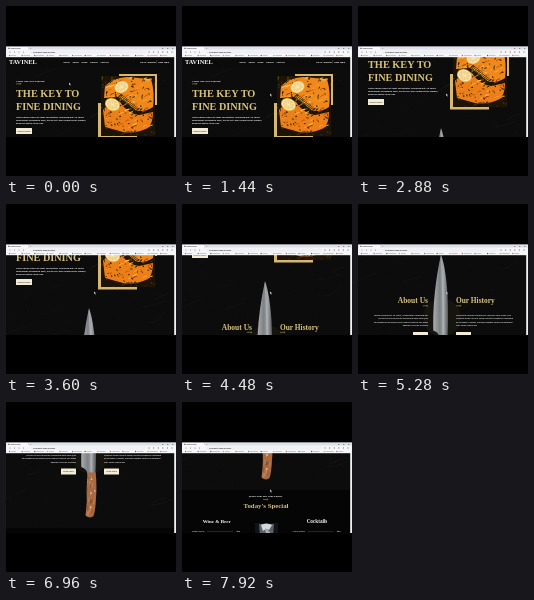
Recreate the animation shown at these times as an HTML page. Size 170 px wide and 170 px high, loop 8 s.

```html
<!DOCTYPE html>
<html lang="en">
<head>
<meta charset="utf-8">
<title>Restaurant page scroll</title>
<style>
html, body { margin: 0; width: 100%; height: 100%; overflow: hidden; background: #000; }
svg { display: block; width: 100vw; height: 100vh; }
text { white-space: pre; }
.serif { font-family: "Liberation Serif", "Noto Serif", serif; font-weight: 700; }
.sans { font-family: "Open Sans", "Noto Sans", sans-serif; font-weight: 700; }
</style>
</head>
<body>
<svg id="stage" viewBox="0 0 170 170"></svg>
<script>
const LOOP = 8000, GOLD = '#d8c27c', FRAME = '#d6b873', WHITE = '#f6f6f6', CREAM = '#f3ecd6';

// [time, value...] stops
const SCROLL = [[0, 0], [1440, 0], [1600, 2], [2080, 17], [2400, 17], [3600, 47],
  [4480, 74], [6080, 127], [7920, 200], [8000, 203]];
const POINTER = [[0, 63, 76.6], [200, 63, 76.6], [480, 70, 80], [1200, 88, 87.5], [8000, 88, 87.5]];

let seed = 11;
const rnd = (a = 0, b = 1) => {
  seed = (seed * 16807) % 2147483647;
  return a + (b - a) * seed / 2147483647;
};
const pick = list => list[rnd(0, list.length) | 0];
const many = (n, f) => Array.from({ length: n }, (_, i) => f(i)).join('');

const rect = (x, y, w, h, fill, more = '') =>
  `<rect x="${x}" y="${y}" width="${w}" height="${h}" fill="${fill}" ${more}/>`;
const path = (d, fill, more = '') => `<path d="${d}" fill="${fill}" ${more}/>`;
const text = (s, x, y, size, fill = WHITE, font = 'sans', anchor = 'start') =>
  `<text class="${font}" x="${x}" y="${y}" font-size="${size}" fill="${fill}" text-anchor="${anchor}">${s}</text>`;
const lines = (list, x, y, step, size, fill, anchor) =>
  list.map((s, i) => text(s, x, y + i * step, size, fill, 'sans', anchor)).join('');
const button = (s, x, y, w) =>
  rect(x, y, w, 6, CREAM, 'rx=".3"') + text(s, x + w / 2, y + 3.7, 1.9, '#5a5342', 'sans', 'middle');
const spoon = (x, y) =>
  path(`M${x} ${y}h3.6m0 0c.6-.6 1.4-.6 1.4 0s-.8.6-1.4 0`, 'none', `stroke="${GOLD}" stroke-width=".45"`);

function lemon(x, y, r, turn) {
  const spokes = many(8, i => `<path d="M0 0V${-r * .75}" transform="rotate(${i * 45})"/>`);
  return `<g transform="translate(${x} ${y}) rotate(${turn}) scale(1 .8)">
    <circle r="${r}" fill="#e8b23a"/><circle r="${r * .88}" fill="#f8ebc2"/>
    <circle r="${r * .74}" fill="#f0cf7c"/>
    <g stroke="#faf0d0" stroke-width=".5">${spokes}</g></g>`;
}

function dish() {
  const glaze = many(70, () =>
    path(`M${rnd(99, 143)} ${rnd(73, 122)}q2-2 4-1.6`, 'none',
      `stroke="${pick(['#ffbd55', '#c4590c', '#ffa032', '#a8440a'])}" stroke-width="${rnd(.4, 1.4)}"`));
  const herbs = many(150, () => {
    const x = rnd(95, 149), y = rnd(70, 130);
    return `<ellipse cx="${x}" cy="${y}" rx="${rnd(.4, 1.7)}" ry="${rnd(.3, .7)}" fill="${pick(['#2c2a0c', '#4d4a16', '#140d05', '#5e2c08'])}" transform="rotate(${rnd(0, 180)} ${x} ${y})"/>`;
  });
  const sprig = many(14, i =>
    path(`M${113 + i * 1.3} ${90 + i * 1.1}l3 -2m-3 2l-.5 3`, 'none', 'stroke="#26260c" stroke-width=".8"'));
  return rect(113, 68, 38, 31, FRAME) + rect(92, 97, 39, 35.5, FRAME) +
    `<g clip-path="url(#photo)">` + rect(95, 70, 54, 60, '#1d1307') +
    path('M99 80Q106 72 121 71L145 73Q149 86 147 101Q138 107 129 104Q121 96 112 91L98 92Z', '#f0891c') +
    path('M97 104Q104 95 113 95Q122 108 133 109L147 106Q147 117 142 122Q129 128 117 126L99 121Z', '#ec7f17') +
    glaze + herbs + sprig + lemon(115.5, 81, 7.4, -20) + lemon(106.5, 98.5, 7.8, 25) + `</g>`;
}

function backdrop() {
  const specks = many(330, () =>
    rect(rnd(0, 170), rnd(51, 287), rnd(.2, .7), rnd(.2, .6), '#8d8266', `opacity="${rnd(.08, .42)}"`));
  const veins = many(22, () =>
    path(`M${rnd(-10, 165)} ${rnd(55, 280)}q${rnd(4, 10)} ${rnd(-7, 2)} ${rnd(12, 24)} ${rnd(-14, -4)}`, 'none',
      `stroke="#796f58" stroke-width=".35" opacity="${rnd(.1, .25)}"`));
  return rect(0, 40, 170, 320, '#0c0c0c') + specks + veins + rect(0, 51, 170, 11, '#0b0b0b') +
    rect(0, 288, 170, 80, '#050505');
}

function nav() {
  const links = [['Home', 57.5], ['About', 66.5], ['Menu', 75.5], ['Awards', 84], ['Contact', 94.5]];
  return text('TAVINEL', 3, 58.4, 6.4, WHITE, 'serif') +
    links.map(([s, x]) => text(s, x, 56.6, 2.1)).join('') +
    text('Log In / Register', 134, 56.6, 2) + rect(150.7, 54.2, .3, 3.4, '#888') +
    text('Book Table', 152.3, 56.6, 2);
}

function hero() {
  return text('Chase The New Flavour', 10, 75.7, 2.8, WHITE, 'serif') + spoon(10, 77.8) +
    text('THE KEY TO', 10, 91, 10.3, GOLD, 'serif') +
    text('FINE DINING', 10, 103.7, 10.2, GOLD, 'serif') +
    lines(['Lorem Ipsum Dolor Sit Amet Consectetur Adipiscing Elit. Sit Tellus',
      'Temporibus Necessaria Nam, Auctor Sit Lacus Ullamcorper Tempus',
      'Rhoncus Mattis Vitae Cras.'], 10, 111.8, 3.2, 2.1, WHITE, 'start') +
    button('Explore Menu', 10, 122, 16) + dish();
}

function knife() {
  const grain = many(22, () =>
    path(`M${rnd(81, 88)} ${rnd(235, 272)}q.5 2-.3 4`, 'none',
      `stroke="${pick(['#6d3c20', '#dfa679'])}" stroke-width=".6" opacity=".7"`));
  return path('M83 151C86 159 88.5 174 89.5 190Q90.6 214 89.5 234H81.5Q81 229 75.3 227C74.7 205 77 178 83 151Z', 'url(#steel)') +
    path('M83 153C84.5 176 85.5 202 85 230', 'none', 'stroke="#d6d8da" stroke-width=".6" opacity=".6"') +
    path('M81.4 232.5L89.7 232.5Q91 247 90 258Q89.5 270 87.5 276Q84 279 79.5 275.5Q81.5 262 80.6 250Z', '#aa6b43') + grain +
    many(3, i => `<circle cx="${85.5 - i * .4}" cy="${239 + i * 14}" r=".9" fill="#d8c6a6"/>`);
}

function about() {
  const left = ['Lorem Ipsum Dolor Sit Amet, Consectetur Adipiscing Elit', 'Auctor Sit Amet Pharetra Adipiscing Nibh Odio Quis',
    'Vitae Magna Faucibus Tempor Neque Volutpat Sed Diam', 'Egestas Ut Purus Tristique'];
  const right = ['Adipiscing Tempus Ullamcorper Lobortis Odio Tellus Arcu', 'Volutpat Risus Placerat Morbi Volutpat Habitasse Interdum',
    'Mi Aliquam In Metus, Pretium Dapibus Turpis Pellentesque', 'Cras Amet Sapien Nisl'];
  return `<circle cx="84" cy="214" r="19" fill="#15140f"/>` +
    text('About Us', 70, 199.5, 7.5, GOLD, 'serif', 'end') + spoon(64.8, 202.3) +
    lines(left, 70, 212, 3.5, 1.95, '#d4d4d4', 'end') + button('Know More', 55, 228.5, 15) + knife() +
    text('Our History', 98, 199.5, 7.4, GOLD, 'serif') + spoon(98, 202.3) +
    lines(right, 98, 212, 3.5, 1.95, '#d4d4d4', 'start') + button('Know More', 98, 228.5, 15);
}

function menu() {
  const item = (name, price, x) => text(name, x, 329.9, 2.2, GOLD, 'serif') +
    rect(x + 15, 329, 26, .25, '#857850') + text(price, x + 48, 329.9, 2.4, WHITE, 'serif', 'end') +
    text('Served Chilled', x, 333.5, 1.8, '#aaa');
  return text('Menu That Fits Your Palette', 83.5, 295, 2.75, WHITE, 'serif', 'middle') + spoon(81, 297.5) +
    text("Today's Special", 84, 306.4, 6.8, GOLD, 'serif', 'middle') +
    text('Wine &amp; Beer', 34.7, 321, 5, WHITE, 'serif', 'middle') +
    text('Cocktails', 135, 321, 5.2, WHITE, 'serif', 'middle') +
    item('House Shiraz', '$56', 10) + item('Citrus Spritz', '$20', 110.5) +
    rect(73, 321, 23, 25, '#111416') + path('M77 322H92L90 346H79Z', '#596167') +
    path('M79 323Q84 320 90 323L87 328Q84 326 81 329Z', '#d3d9db') + path('M83 326L88 330L85 340Z', '#a7b0b4');
}

function browser() {
  const marks = many(13, i => {
    const x = 3 + i * 12.6;
    return rect(x, 48.9, 1.2, 1.2, ['#d15a4d', '#4b7fc4', '#555', '#d4a33b'][i % 4]) +
      rect(x + 2, 49.2, 5 + (i % 3) * 1.5, .6, '#a5a7aa');
  });
  return rect(0, 40.6, 170, 10.6, '#f6f6f8') + rect(0, 40.6, 170, 3, '#dfe1ea') +
    rect(1, 41.1, 21, 2.8, '#fafafa', 'rx=".6"') + rect(2.3, 41.8, 1.2, 1.2, '#555') +
    text('Home Page', 4.4, 43.1, 1.8, '#444') + text('+', 24, 43.2, 2.4, '#555') +
    many(3, i => rect(156 + i * 5, 42.2, 1.3, .6, '#555')) +
    many(4, i => `<circle cx="${4 + i * 4.5}" cy="46" r=".6" fill="#888"/>`) +
    rect(24, 44.6, 116, 2.8, '#eff0f3', 'rx="1.3"') + text('localhost:3000/#home', 27, 46.7, 2, '#444') +
    many(6, i => `<circle cx="${143 + i * 4.6}" cy="46" r=".65" fill="${i === 1 ? '#d8694a' : '#888'}"/>`) +
    marks + rect(168.2, 51, 1.8, 80, '#f1f1f1');
}

document.getElementById('stage').innerHTML = `
  <defs>
    <clipPath id="view"><rect y="51" width="170" height="80"/></clipPath>
    <clipPath id="photo"><rect x="95" y="70" width="54" height="60"/></clipPath>
    <linearGradient id="steel">
      <stop offset="0" stop-color="#a9abad"/><stop offset=".45" stop-color="#7e8184"/>
      <stop offset=".7" stop-color="#a5a7a9"/><stop offset="1" stop-color="#55585b"/>
    </linearGradient>
  </defs>
  <g clip-path="url(#view)"><g id="page">${backdrop() + nav() + hero() + about() + menu()}</g></g>
  ${browser()}
  <path id="pointer" d="M0 0V2.6L.7 2L1.2 3L1.7 2.7L1.2 1.8H2Z" fill="#fff" stroke="#222" stroke-width=".2"/>`;

function at(stops, t) {
  const i = Math.max(1, stops.findIndex(s => s[0] >= t));
  const a = stops[i - 1], b = stops[i], k = (t - a[0]) / (b[0] - a[0]);
  return a.slice(1).map((v, j) => v + (b[j + 1] - v) * k);
}

const page = document.getElementById('page'), pointer = document.getElementById('pointer');
function draw() {
  const t = Math.floor(performance.now() % LOOP / 80) * 80;
  page.setAttribute('transform', `translate(0 ${-at(SCROLL, t)[0]})`);
  pointer.setAttribute('transform', `translate(${at(POINTER, t).join(' ')})`);
  requestAnimationFrame(draw);
}
draw();
</script>
</body>
</html>
```
